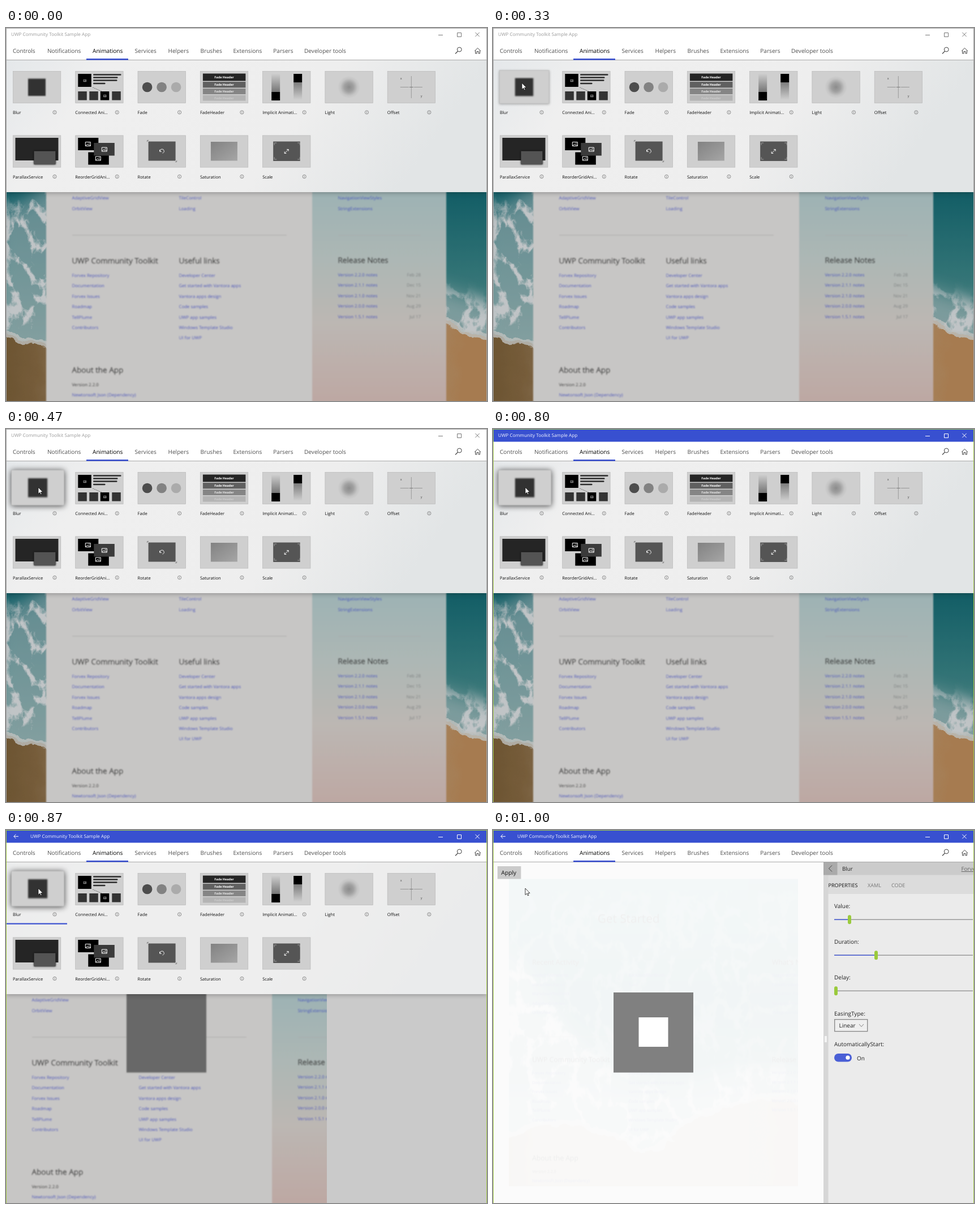
An HTML page that plays this animation: 850x659 px, repeating every 1.07 s.

```html
<!DOCTYPE html>
<html lang="en">
<head>
<meta charset="utf-8">
<title>Toolkit sample app</title>
<style>
html, body { margin: 0; width: 100%; height: 100%; overflow: hidden; background: #fff; }
svg { position: absolute; left: 0; top: 0; width: 850px; height: 659px; overflow: hidden; }
text { font-family: "Open Sans", "Noto Sans", sans-serif; text-rendering: geometricPrecision; white-space: pre; }

/* every change is a hard step inside one 1070 ms loop */
.a { animation: 1070ms step-end infinite; }
#home { animation-name: home; }
#shift { animation-name: shift; }
#sample { animation-name: sample; }
#menu { animation-name: menu; }
#zoom { animation-name: zoom; transform-origin: 283.5px 358px; }
#side { animation-name: side; }
#dim { animation-name: dim; }
#hover { animation-name: hover; transform-origin: 54.5px 104.5px; }
#cursor { animation-name: cursor; }
.active { animation-name: active; }
.opened { animation-name: opened; }
#caption { animation-name: caption; }
#winIcons { animation-name: winIcons; }

@keyframes home { 0% { opacity: 1 } 81.25%, 100% { opacity: 0 } }
@keyframes shift { 0% { opacity: 0 } 81.25% { opacity: 1 } 86.85%, 100% { opacity: 0 } }
@keyframes sample { 0% { opacity: 0 } 86.85%, 100% { opacity: 1 } }
@keyframes menu {
  0% { opacity: 1; transform: none }
  86.85% { opacity: .88; transform: translateY(-159px) }
  93.4%, 100% { opacity: 0; transform: translateY(-240px) }
}
@keyframes zoom {
  0% { opacity: .4; transform: scale(.92) }
  93.4%, 100% { opacity: .055; transform: scale(.901) }
}
@keyframes side {
  0% { opacity: .72; transform: translateX(52.5px) }
  93.4%, 100% { opacity: 1; transform: none }
}
@keyframes dim { 0% { opacity: .035 } 93.4%, 100% { opacity: 0 } }
@keyframes hover {
  0% { transform: none; filter: none }
  30.8% { transform: translate(.5px, -.4px) scale(1.04); filter: drop-shadow(0 1px 2px rgba(0,0,0,.3)) }
  37.3% { transform: translate(1.2px, -.8px) scale(1.08); filter: drop-shadow(0 1px 4px rgba(0,0,0,.5)) }
  43.85%, 100% { transform: translate(1.5px, -1px) scale(1.1); filter: drop-shadow(0 1px 5px rgba(0,0,0,.7)) }
}
@keyframes cursor {
  0% { opacity: 0; transform: translate(20px, 66px) }
  18.6% { opacity: 1; transform: translate(20px, 66px) }
  25.15% { opacity: 1; transform: translate(36px, 82px) }
  30.8% { opacity: 1; transform: translate(51px, 97px) }
  37.3%, 100% { opacity: 1; transform: translate(57px, 103px) }
}
@keyframes active { 0% { opacity: 0 } 62.55%, 100% { opacity: 1 } }
@keyframes opened { 0% { opacity: 0 } 81.25%, 100% { opacity: 1 } }
@keyframes caption {
  0% { fill: #9a9a9a; transform: none }
  62.55% { fill: #f4f6ff; transform: none }
  81.25%, 100% { fill: #f4f6ff; transform: translateX(34px) }
}
@keyframes winIcons { 0% { stroke: #777 } 62.55%, 100% { stroke: #fff } }
</style>
</head>
<body>
<script>
const R = (x, y, w, h, fill, more = '') => `<rect x="${x}" y="${y}" width="${w}" height="${h}" fill="${fill}" ${more}/>`;
const T = (x, y, size, str, fill = '#222', more = '') => `<text x="${x}" y="${y}" font-size="${size}" fill="${fill}" ${more}>${str}</text>`;
const L = (d, color, width = 1, more = '') => `<path d="${d}" fill="none" stroke="${color}" stroke-width="${width}" ${more}/>`;
const C = (x, y, r, fill, more = '') => `<circle cx="${x}" cy="${y}" r="${r}" fill="${fill}" ${more}/>`;
const layer = (id, body) => `<svg id="${id}" class="a" viewBox="0 0 850 659">${body}</svg>`;
const gradient = (id, dir, ...stops) => `<linearGradient id="${id}" x2="${dir[0]}" y2="${dir[1]}">` +
  stops.map(([o, c]) => `<stop offset="${o}" stop-color="${c}"/>`).join('') + '</linearGradient>';

const defs = `<svg viewBox="0 0 850 659"><defs>
${gradient('water', [0, 1], [0, '#4fb0b4'], [.4, '#197680'], [.62, '#3d8f92'], [1, '#8ab8b2'])}
${gradient('sand', [1, 0], [0, '#7f6338'], [.1, '#937348'], [.25, '#c6b199'], [.75, '#cbb499'], [.92, '#cf9a64'])}
${gradient('tint', [0, 1], [0, '#9cb3b5'], [.39, '#9eb3b4'], [.58, '#adb7b5'], [.76, '#bcb7b3'], [1, '#bda7a2'])}
${gradient('sheet', [1, .25], [0, '#e2e6e9'], [.25, '#efefef'], [.7, '#eeeeee'], [1, '#e2e5e6'])}
${gradient('down', [0, 1], [0, '#cdcdcd'], [1, '#757575'])}
${gradient('up', [0, 1], [0, '#7c7c7c'], [1, '#cfcfcf'])}
${gradient('sat', [1, 1], [0, '#828282'], [1, '#a6a6a6'])}
<radialGradient id="glow"><stop stop-color="#8c8c8c"/><stop offset=".4" stop-color="#a0a0a0"/><stop offset=".75" stop-color="#c4c4c4"/><stop offset="1" stop-color="#cfcfcf"/></radialGradient>
<filter id="soft" x="-10%" y="-10%" width="120%" height="120%"><feGaussianBlur stdDeviation=".85"/></filter>
<filter id="haze" x="-10%" y="-10%" width="120%" height="120%"><feGaussianBlur stdDeviation="16"/></filter>
<filter id="foam" x="0" y="0" width="1" height="1" color-interpolation-filters="sRGB">
  <feTurbulence type="turbulence" baseFrequency=".022 .016" numOctaves="5" seed="4"/>
  <feColorMatrix values="0 0 0 0 .94  0 0 0 0 .96  0 0 0 0 .97  -7 0 0 0 2.1" result="veins"/>
  <feGaussianBlur in="SourceGraphic" stdDeviation="14"/>
  <feComposite in="veins" operator="in"/>
</filter>
<filter id="rough" x="-5%" y="-10%" width="110%" height="120%" color-interpolation-filters="sRGB">
  <feTurbulence type="fractalNoise" baseFrequency=".03" numOctaves="4" seed="9"/>
  <feDisplacementMap in="SourceGraphic" scale="26" xChannelSelector="R" yChannelSelector="G"/>
</filter>
<clipPath id="pageBox"><rect y="57" width="567" height="602"/></clipPath>
</defs></svg>`;

// beach seen from above, 850 wide: water, hazy surf with lacy foam, then sand
const shore = 'M-20 535Q70 575 142 552T280 538Q350 555 388 580T486 534Q560 495 627 485T778 522L880 560';
const surf = 'M-20 325Q60 315 130 190Q200 240 265 360Q390 500 520 450T740 450L880 500V600H-20Z';
const beach = R(0, 57, 850, 602, 'url(#water)') +
  `<path d="${surf}" fill="#dfe7ea" opacity=".5" filter="url(#haze)"/>` +
  R(120, 80, 590, 330, '#fff', 'opacity=".35" filter="url(#foam)"') +
  `<path d="${surf}" fill="#fff" filter="url(#foam)"/>` +
  `<g filter="url(#rough)"><path d="${shore}V690H-40Z" fill="url(#sand)"/>${L(shore, '#eef0ee', 12, 'opacity=".8"')}</g>`;

const row = 18.4, linkColor = '#3c49b9';
const list = (x, y, items) => items.map((s, i) => T(x, y + i * row, 7.9, s, linkColor)).join('');
const heading = (x, y, s) => T(x, y, 13.5, s, '#333', 'stroke="#333" stroke-width=".25"');
const notes = [['2.2.0', 'Feb 28'], ['2.1.1', 'Dec 15'], ['2.1.0', 'Nov 21'], ['2.0.0', 'Aug 29'], ['1.5.1', 'Jul 17']];

const pageText =
  T(174, 142, 23, 'Get Started', '#333') +
  heading(45.5, 225, 'Recent Activity') + heading(516, 225, 'What\'s New') +
  list(45.5, 248, ['Implicit Animations', 'Markdown Parser', 'MarkdownTextBlock', 'AdaptiveGridView', 'OrbitView']) +
  list(234.5, 248, ['BackdropBlurBrush', 'Toast', 'Staggered', 'TileControl', 'Loading']) +
  list(515.5, 248, ['StaggeredPanel', 'RadialGradientBrush', 'Markdown Parser', 'NavigationViewStyles', 'StringExtensions']) +
  L('M46 366H425M516 366H662', '#aaa') +
  heading(45.5, 415.5, 'UWP Community Toolkit') + heading(234.5, 415.5, 'Useful links') + heading(515.5, 415, 'Release Notes') +
  list(45.5, 440, ['Forvex Repository', 'Documentation', 'Forvex Issues', 'Roadmap', 'TellPlume', 'Contributors']) +
  list(234.5, 440, ['Developer Center', 'Get started with Vantora apps', 'Vantora apps design', 'Code samples',
    'UWP app samples', 'Windows Template Studio', 'UI for UWP']) +
  notes.map(([v, d], i) => T(515.5, 439 + i * row, 7.9, `Version ${v} notes`, linkColor) +
    T(662, 439 + i * row, 7.9, d, '#7b7f7f', 'text-anchor="end"')).join('') +
  heading(45.5, 609, 'About the App') + T(45.5, 633, 7.9, 'Version 2.2.0', '#222') +
  T(45.5, 651, 7.9, 'Newtonsoft Json (Dependency)', linkColor);

const panels = R(0, 57, 470, 610, '#c7c6c5') + R(470, 57, 237, 610, 'url(#tint)');

const home = layer('home', beach + R(0, 57, 850, 602, '#000', 'opacity=".2"') +
  `<g transform="translate(71)" filter="url(#soft)">${panels}${pageText}</g>`);

const shift = layer('shift', R(0, 57, 850, 602, '#cacaca') +
  `<g clip-path="url(#pageBox)"><g filter="url(#soft)">${panels}${pageText}</g></g>` +
  R(213, 280, 141, 148.5, '#676767', 'filter="url(#soft)"'));

// property pane
const slider = (y, label, x) => T(603, y - 20, 10, label) + L(`M603 ${y}H848`, '#9a9a9a', 1.4) +
  L(`M603 ${y}H${x}`, '#4a5fd6', 1.6) + R(x - 3, y - 8, 6, 16, '#9aca3c', 'rx="3"');
const side = '<g id="side" class="a">' +
  R(584, 57, 270, 602, '#ebebeb') + R(584, 57, 270, 56, '#dcdcdc') + R(584, 57, 8.5, 602, '#d6d6d6') +
  R(584, 57, 270, 22.5, '#cbcbcb') + R(584, 57, 24.5, 22.5, '#aaa') + R(586, 364, 4, 11, '#f3f3f3') +
  L('M599 62.5L593.5 68L599 73.5', '#444') +
  T(617, 72, 9.7, 'Blur') + T(827.5, 72, 9.7, 'Forvex', '#666', 'text-decoration="underline"') +
  T(592.5, 100.5, 9.1, 'PROPERTIES', '#111') + T(662, 100.5, 9.1, 'XAML', '#777') + T(704, 100.5, 9.1, 'CODE', '#777') +
  slider(158.3, 'Value:', 630) + slider(221.3, 'Duration:', 677) + slider(284.3, 'Delay:', 606) +
  T(603, 327.5, 10, 'EasingType:') + R(603.7, 334.7, 58, 21, '#efefef', 'stroke="#8c8c8c" stroke-width="1.4"') +
  T(611.5, 348.5, 10, 'Linear') + L('M647 343L651 347.5L655 343', '#777', .9) +
  T(603, 382, 10, 'AutomaticallyStart:') + R(603, 395, 31, 14.5, '#4a5fd6', 'rx="7.2"') + C(627, 402.2, 3.6, '#fff') +
  T(643, 406.5, 10, 'On') + '</g>';

const sample = layer('sample', R(0, 57, 850, 602, '#fbfbfb') +
  `<g id="zoom" class="a"><g clip-path="url(#pageBox)"><g transform="translate(-141.5)">${beach}</g>` +
  R(0, 57, 567, 602, '#fff', 'opacity=".2"') + R(470, 57, 97, 602, '#999', 'opacity=".15"') + pageText + '</g></g>' +
  R(8, 64, 41.5, 22.5, '#cbcbcb') + T(14.5, 79.3, 10.2, 'Apply', '#111') +
  R(213, 287, 141, 141.5, '#808080') + R(257.5, 331, 52, 52, '#fff') + side +
  R(0, 57, 850, 602, '#000', 'id="dim" class="a"'));

// tiles: each icon is drawn relative to its 85 x 57 card
const picture = (x, y, s = 1) => `<g transform="translate(${x} ${y}) scale(${s})">` +
  L('M-4.5 -3.5H4.5V3.5H-4.5ZM-4 3L-1 0L1 1.8L2.2 .8L4.3 3', '#fff', 1) + C(2, -1.4, .8, '#fff') + '</g>';
const fadeBar = ([y, h, fill, ink]) => R(5, y, 75.5, h, fill) +
  T(42.7, y + h / 2 + 2, 5.5, 'Fade Header', ink, 'text-anchor="middle" font-weight="700"');
const corners = (x, y) => L(`M${x - 1} ${y + 3}v-4h4M${x + 40} ${y - 1}h4v4M${x - 1} ${y + 24}v4h4M${x + 40} ${y + 28}h4v-4`, '#aaa', .8);

const tiles = [
  ['Blur', R(27, 13.5, 31, 30.5, '#303030', 'filter="url(#soft)"')],
  ['Connected Ani...', R(5, 5, 23.5, 23, '#000') + picture(17, 17, .5) +
    L('M33 6.5H80M33 11.5H74M33 16.5H73M33 22H52', '#2d2d2d', 2.6, 'stroke-linecap="round"') +
    L('M31 29L47 36', '#555', .8, 'stroke-dasharray="2 1"') +
    [5, 25, 44.5, 65].map((x, i) => R(x, 36, 15.5, 15.5, i === 2 ? '#000' : '#333')).join('') + picture(52.5, 44, .5)],
  ['Fade', C(17, 28.5, 8.8, '#4d4d4d') + C(42.5, 28.5, 8.8, '#828282') + C(68, 28.5, 8.8, '#ababab')],
  ['FadeHeader', [[4.5, 13, '#252525', '#fff'], [19, 10.5, '#606060', '#fff'], [31, 10, '#858585', '#e6e6e6'],
    [42.5, 10, '#b4b4b4', '#cbcbcb']].map(fadeBar).join('')],
  ['Implicit Animati...', R(16, 5, 15, 32, 'url(#down)') + R(16, 37, 15, 15, '#000') +
    R(55, 20, 15, 31, 'url(#up)') + R(55, 5, 15, 15, '#000')],
  ['Light', C(42.5, 28.5, 20, 'url(#glow)')],
  ['Offset', L('M42.5 9V48M23 28.5H38M47 28.5H62', '#8b8b8b', .8) + L('M39 28.5H46', '#666', .8) +
    T(23, 14.5, 5.5, 'x', '#444') + T(59, 46, 5.5, 'y', '#444')],
  ['ParallaxService', R(4.5, 4.5, 76, 40, '#252525') + R(37.5, 28, 38, 23.5, '#545454', 'style="filter:drop-shadow(0 0 1.5px #000)"')],
  ['ReorderGridAni...', R(5, 4.5, 36, 22, '#000') + R(23, 30, 36.5, 22, '#000') + R(33, 13.5, 36.5, 22.5, '#3b3b3b') +
    picture(22.5, 15.5) + picture(51.5, 25) + picture(40.5, 41)],
  ['Rotate', R(19, 11, 48, 34, '#555') + L('M39.5 28.5A3.6 3.6 0 1 1 44 31.5M39 25.5V28.8H42.3', '#eee', 1) +
    L('M17 11.5v-2.5h2.5M69 44.5v2.5h-2.5', '#666', .8)],
  ['Saturation', R(19, 11.5, 47, 33.5, 'url(#sat)')],
  ['Scale', R(19, 11, 47.5, 34.5, '#555') + corners(22, 14.5) +
    L('M39 32L46 25M42.8 25H46V28.2M39 28.8V32H42.2', '#fff', .9)]
];

const tile = ([name, icon], i) => {
  const x = 12 + 110.3 * (i % 7), y = i < 7 ? 76 : 189.5;
  const card = `<g transform="translate(${x} ${y})">${R(.4, .4, 84.4, 56.2, '#cfcfcf', 'stroke="#b9b9b9" stroke-width=".7"')}${icon}</g>`;
  return (i ? card : `<g id="hover" class="a">${card}</g>`) +
    T(x, y + 76.3, 7.6, name, '#111') +
    C(x + 74, y + 73, 3.1, 'none', 'stroke="#666" stroke-width=".7"') +
    L(`M${x + 74} ${y + 72.5}v2.2M${x + 74} ${y + 71}v.8`, '#666', .7);
};

const menu = layer('menu', R(0, 0, 850, 290, 'url(#sheet)', 'style="filter:drop-shadow(0 1px 4px rgba(0,0,0,.3))"') +
  `<g class="a opened">${R(0, 0, 850, 290, '#eee', 'opacity=".7"')}${R(0, 164.5, 108, 2.2, '#3a50d0')}</g>` +
  tiles.map(tile).reverse().join(''));

const nav = [['Controls', 12], ['Notifications', 73], ['Animations', 153], ['Services', 227.5], ['Helpers', 286.5],
  ['Brushes', 343.5], ['Extensions', 401.5], ['Parsers', 472.3], ['Developer tools', 527]];

const head = layer('head', R(0, 0, 850, 56, '#fff') +
  R(0, 0, 850, 22.5, '#3850d0', 'class="a active"') +
  `<g class="a opened">${L('M22 11.3H14M17.5 7.6L13.8 11.3L17.5 15', '#fff')}</g>` +
  T(9, 14.4, 8.2, 'UWP Community Toolkit Sample App', '#9a9a9a', 'id="caption" class="a"') +
  `<path id="winIcons" class="a" fill="none" d="M764 12.5H772M797.5 8.5H804.5V15.5H797.5ZM829.3 7.8L836.7 15.2M836.7 7.8L829.3 15.2"/>` +
  nav.map(([s, x]) => T(x, 44, 10.1, s, s === 'Animations' ? '#000' : '#505050')).join('') +
  L('M0 56.5H850', '#a9a9a9') + R(142, 54, 74, 2.6, '#3a50d0') +
  C(801.2, 38, 3.9, 'none', 'stroke="#444"') + L('M798.4 41L794 45.5', '#444', 1.1) +
  L('M828.2 40.5L833.5 35.4L838.8 40.5M829.6 39.5V45H832V41.5H835V45H837.4V39.5', '#444', 1));

const border = (color, more = '') => R(.5, .5, 849, 668, 'none', `stroke="${color}" ${more}`);
const overlay = `<svg viewBox="0 0 850 659">${border('#a3a3a3')}${border('#a0c648', 'class="a active"')}
<path id="cursor" class="a" d="M0 0V11.6L2.7 9.1L4.5 13L6.2 12.2L4.5 8.5H8.1Z" fill="#fff" stroke="#111" stroke-width=".8"/></svg>`;

document.body.innerHTML = defs + home + shift + sample + menu + head + overlay;
</script>
</body>
</html>
```
